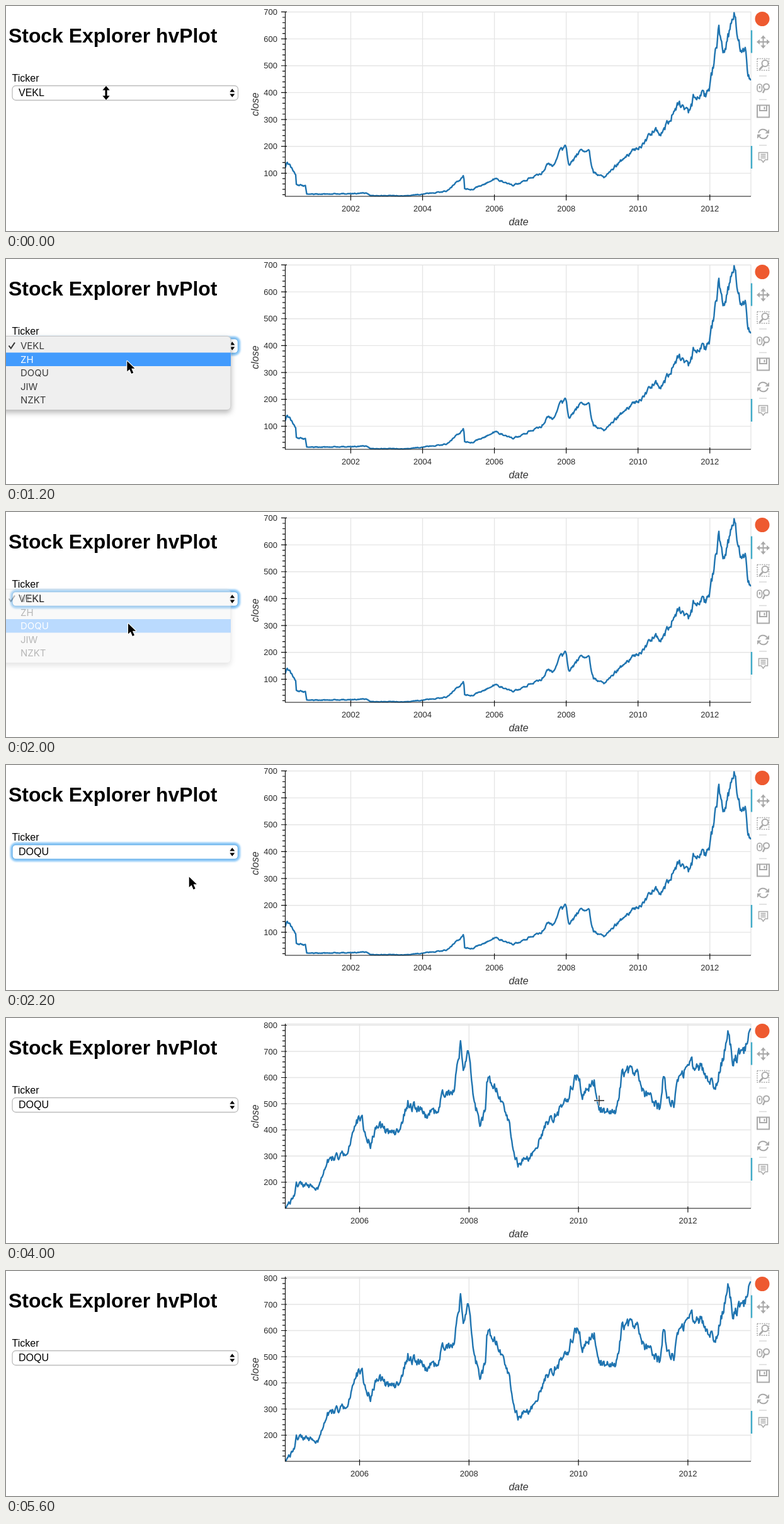
These frames come from a looping animation (1226 px wide and 357 px high, 5.8 s). An HTML page:

```html
<!DOCTYPE html>
<html lang="en">
<head>
<meta charset="utf-8">
<title>Stock Explorer</title>
<style>
  html, body { margin: 0; width: 100%; height: 100%; overflow: hidden; background: #fff; }
  svg { display: block; font-family: "Liberation Sans", Arial, sans-serif; }
  .tick { font-size: 13px; fill: #2a2a2a; }
  .name { font-size: 16px; font-style: italic; fill: #333; }
  .menu text { font: 15px Inter, sans-serif; }
  .tip text { font-size: 14.4px; fill: #333; }
  .tip .key { fill: #3ba4d2; text-anchor: end; }
  .icon { fill: none; stroke: #a9a9a9; stroke-width: 2; }
  .solid { fill: #a9a9a9; stroke: none; }
</style>
</head>
<body>
<svg width="1226" height="357" viewBox="0 0 1226 357">
  <defs>
    <clipPath id="plot"><rect x="443" y="9" width="740.5" height="293.5"/></clipPath>
    <filter id="shade" x="-10%" y="-10%" width="120%" height="130%">
      <feDropShadow dx="0" dy="4" stdDeviation="4" flood-opacity=".28"/>
    </filter>
    <filter id="soft" x="-5%" y="-50%" width="110%" height="200%">
      <feGaussianBlur stdDeviation="1.5"/>
    </filter>
  </defs>

  <text x="4" y="58" font-size="31.9" font-weight="bold">Stock Explorer hvPlot</text>
  <text x="9.5" y="120" font-size="16">Ticker</text>

  <rect id="glow" x="9" y="125" width="361" height="26" rx="7" fill="none" stroke="#7cc0f5" stroke-width="4" filter="url(#soft)"/>
  <rect id="box" x="10" y="126.5" width="358.5" height="23" rx="5.5" fill="#fff" stroke-width="1.3"/>
  <path d="M355.3 136.6l4-5.4 4 5.4zM355.3 139.4l4 5.4 4-5.4z"/>
  <text id="picked" x="20" y="143" font-size="16"></text>

  <g id="charts"></g>

  <g id="tools">
    <circle cx="1201" cy="20.5" r="11.5" fill="#ee5a30"/>
    <path d="M1184 38.5v36M1184 222v36" stroke="#3fabc8" stroke-width="2.4"/>
    <path d="M1196 111h12M1196 148.5h12M1196 221h12" stroke="#d9d9d9" stroke-width="1.6"/>
    <g class="icon" transform="translate(1202.5 57)">
      <path d="M-7 0H7M0-7V7"/>
      <path class="solid" d="M-10.5 0l5-4.2v8.4zM10.5 0l-5-4.2v8.4zM0-10.5l-4.2 5h8.4zM0 10.500l-4.200-5h8.400z"/>
    </g>
    <g class="icon" transform="translate(1202.5 93)">
      <rect x="-9.5" y="-9.5" width="18.5" height="18.5" stroke-width="1.5" stroke-dasharray="2 1.6"/>
      <circle cx="3" cy="-2" r="5" fill="#fff"/><path d="M-.5 2l-5.500 6" stroke-width="2.7"/>
    </g>
    <g class="icon" transform="translate(1202.5 130)">
      <rect x="-9.5" y="-6" width="7.5" height="12" rx="3.7" stroke-width="1.7"/><path d="M-5.7-3v4"/>
      <circle cx="5" cy="-2" r="4.5"/><path d="M2.5 2L-.5 8" stroke-width="2.5"/>
    </g>
    <g class="icon" transform="translate(1202.5 167)" stroke-width="1.7">
      <rect x="-9.5" y="-9.5" width="19" height="19"/><path d="M-5.5-9v8h11v-8M2-7v4"/>
    </g>
    <g class="icon" transform="translate(1202.5 203)">
      <path d="M-7.5-1.5A7.500 7.500 0 0 1 6-4M7.5 1.5A7.5 7.5 0 0 1-6 4"/>
      <path class="solid" d="M9.5-7.5V-.8H3zM-9.5 7.5V.8H-3z"/>
    </g>
    <g class="icon" transform="translate(1202.5 240)">
      <path d="M-7-7.5H7V4H3L0 8-3 4H-7zM-4-4.5H4M-4-1.7H4M-4 1.1H4" stroke-width="1.5"/>
    </g>
  </g>

  <g id="menu" class="menu">
    <rect x="-8" y="122.5" width="365" height="117" rx="6" fill="#efefef" stroke="#c4c4c4" filter="url(#shade)"/>
    <rect id="bar" x="0" width="357" height="21.5" fill="#429bfd"/>
    <path id="check" d="M4.5 137.5l3.3 4.3 6.2-9.3" fill="none" stroke-width="2"/>
    <g id="items"></g>
  </g>

  <g id="tip" class="tip">
    <path d="M587 180l10-9v18z" fill="#a3a3a3"/>
    <rect x="597" y="149.5" width="194" height="60.5" fill="#fff" stroke="#e2e2e2" stroke-width="1.5"/>
    <text class="key" x="646" y="172">date:</text><text x="648" y="172">2006-03-29 00:00:00</text>
    <text class="key" x="646" y="195">close:</text><text x="648" y="195">394.980</text>
  </g>

  <g id="pointers" stroke-linejoin="round">
    <path id="resize" d="M0-11l5.5 6.5h-4v9h4L0 11l-5.5-6.500h4v-9h-4z" stroke="#ddd" paint-order="stroke"/>
    <path id="arrow" d="M0 0v16.5l3.9-3.6 3 7 3-1.3-3-6.800h5.300z" stroke="#fff" stroke-width="2.2" paint-order="stroke"/>
    <g id="cross">
      <path d="M-8 0H8M0-8V8" stroke="#fff" stroke-width="3"/>
      <path d="M-8 0H8M0-8V8" stroke="#222" stroke-width="1.3"/>
    </g>
  </g>
</svg>

<script>
const $ = id => document.getElementById(id);
const LEFT = 443.5, RIGHT = 1183, TOP = 9.5, BOTTOM = 302;
const LOOP = 5800, STEP = 200, ROW = 21.5;
const TICKERS = ['VEKL', 'ZH', 'DOQU', 'JIW', 'NZKT'];

// turns: the main turning points of each curve, joined by a seeded jitter.
const SERIES = [
  {
    zero: 308, step: 42.65, year: 2002, yearX: 547.5, yearGap: 114.05,
    seed: 11, jitter: y => 0.4 + (BOTTOM - y) * 0.035,
    turns: [[443, 257], [447, 249], [460, 266], [461, 283], [476, 286], [477, 299], [573, 297], [578, 301],
      [640, 301], [700, 294], [727, 270], [728, 290], [740, 292], [777, 274], [805, 285], [850, 266],
      [863, 248], [868, 256], [880, 230], [889, 223], [894, 254], [911, 230], [926, 233], [933, 265],
      [950, 272], [985, 237], [1010, 222], [1030, 196], [1041, 202], [1068, 157], [1087, 168], [1092, 143],
      [1116, 139], [1132, 41], [1138, 76], [1158, 12], [1167, 70], [1175, 78], [1178, 112], [1183, 122]]
  },
  {
    zero: 343.5, step: 41.5, year: 2006, yearX: 561.5, yearGap: 173.8,
    seed: 29, jitter: y => 3 + (BOTTOM - y) * 0.022,
    turns: [[443, 300], [458, 284], [461, 265], [497, 268], [511, 226], [544, 215], [551, 172], [565, 153],
      [569, 182], [579, 202], [589, 167], [612, 186], [625, 182], [638, 135], [665, 154], [684, 147],
      [695, 116], [709, 127], [722, 42], [726, 80], [735, 54], [743, 132], [753, 169], [761, 150],
      [764, 100], [774, 104], [799, 164], [804, 205], [813, 232], [838, 216], [860, 164], [888, 138],
      [909, 87], [916, 122], [934, 101], [942, 146], [968, 152], [979, 88], [1003, 86], [1016, 121],
      [1038, 142], [1044, 90], [1051, 132], [1061, 135], [1067, 97], [1083, 74], [1106, 78], [1112, 99],
      [1127, 107], [1147, 28], [1155, 68], [1173, 50], [1183, 10]]
  }
];

// Straight-line reading of [key, value, ...] points.
function along(points, k) {
  const i = points.findIndex(p => p[0] > k);
  if (i < 0) return points.at(-1).slice(1);
  const [a, b] = [points[Math.max(0, i - 1)], points[i]];
  const f = b === a ? 0 : (k - a[0]) / (b[0] - a[0]);
  return a.slice(1).map((v, n) => v + (b[n + 1] - v) * f);
}

function random(seed) {
  return () => (seed = (seed * 16807) % 2147483647) / 2147483647;
}

function curve({ turns, jitter, seed }) {
  const rnd = random(seed * 7919), points = [];
  let drift = 0;
  for (let x = LEFT; x <= RIGHT; x += 1.1) {
    const [y] = along(turns, x);
    drift = drift * 0.55 + rnd() * 2 - 1;
    const v = y + drift * jitter(y);
    points.push(x.toFixed(1) + ' ' + Math.min(301.5, Math.max(10, v)).toFixed(1));
  }
  return 'M' + points.join('L');
}

function chart(s) {
  let grid = `M${LEFT} ${TOP}H${RIGHT}V${BOTTOM}`, ticks = `M${LEFT} 9V${BOTTOM}H${RIGHT}`, labels = '';
  for (let k = 0, y = s.zero; y > 9; y = s.zero - ++k * s.step / 5) {
    if (y > BOTTOM - 1) continue;
    const major = k % 5 === 0;
    ticks += `M${major ? 437 : 439} ${y}H${major ? 446 : LEFT}`;
    if (!major) continue;
    grid += `M${LEFT} ${y}H${RIGHT}`;
    labels += `<text class="tick" x="431" y="${y + 4.7}" text-anchor="end">${k * 20}</text>`;
  }
  for (let x = s.yearX, year = s.year; x < RIGHT; x += s.yearGap, year += 2) {
    grid += `M${x} ${TOP}V${BOTTOM}`;
    ticks += `M${x} 299V308.5`;
    labels += `<text class="tick" x="${x}" y="325.5" text-anchor="middle">${year}</text>`;
  }
  return `<g><path d="${grid}" fill="none" stroke="#e5e5e5" stroke-width="1.4"/>
    <path d="${curve(s)}" fill="none" stroke="#1f74b0" stroke-width="2.4" stroke-linejoin="round" clip-path="url(#plot)"/>
    <path d="${ticks}" fill="none" stroke="#111" stroke-width="1.2"/>${labels}
    <text class="name" x="814" y="348" text-anchor="middle">date</text>
    <text class="name" transform="translate(401 156) rotate(-90)" text-anchor="middle">close</text></g>`;
}

$('charts').innerHTML = SERIES.map(chart).join('');
$('items').innerHTML = TICKERS.map((name, i) => `<text x="23" y="${143 + i * ROW}">${name}</text>`).join('');

// time, x, y
const PATH = [[0, 159, 138], [200, 159, 138], [800, 189, 132], [1400, 194, 177], [2000, 194, 177],
  [2800, 581, 179], [3000, 581, 179], [4000, 942, 131], [4800, 1080, 100]];

const show = (el, on) => { el.style.display = on ? '' : 'none'; };

function pointerAt(t) {
  if (t < 400) return 'resize';
  if (t < 2600) return 'arrow';
  return t < 4800 ? 'cross' : '';
}

function draw(time) {
  const t = Math.floor(time / STEP) * STEP;
  const [x, y] = along(PATH, t);
  const row = Math.min(2, Math.max(0, Math.round((y - 137.5) / ROW)));
  const open = t >= 400 && t < 2200, focus = t >= 400 && t < 2400;

  for (const p of $('pointers').children) {
    show(p, p.id === pointerAt(t));
    p.setAttribute('transform', `translate(${x} ${y})`);
  }
  show($('menu'), open);
  $('menu').setAttribute('opacity', t < 2000 ? 1 : 0.36);
  $('bar').setAttribute('y', 127 + row * ROW);
  $('check').setAttribute('stroke', row ? '#333' : '#fff');
  [...$('items').children].forEach((el, i) => el.setAttribute('fill', i === row ? '#fff' : '#3a3a3a'));
  show($('glow'), focus);
  $('box').setAttribute('stroke', focus ? '#6db3ea' : '#bcbcbc');
  $('picked').textContent = TICKERS[t < 2200 ? 0 : 2];
  [...$('charts').children].forEach((el, i) => show(el, i === (t < 2400 ? 0 : 1)));
  show($('tip'), t >= 2800 && t < 3200);
}

const start = performance.now();
function loop() {
  draw((performance.now() - start) % LOOP);
  requestAnimationFrame(loop);
}
loop();
</script>
</body>
</html>
```
